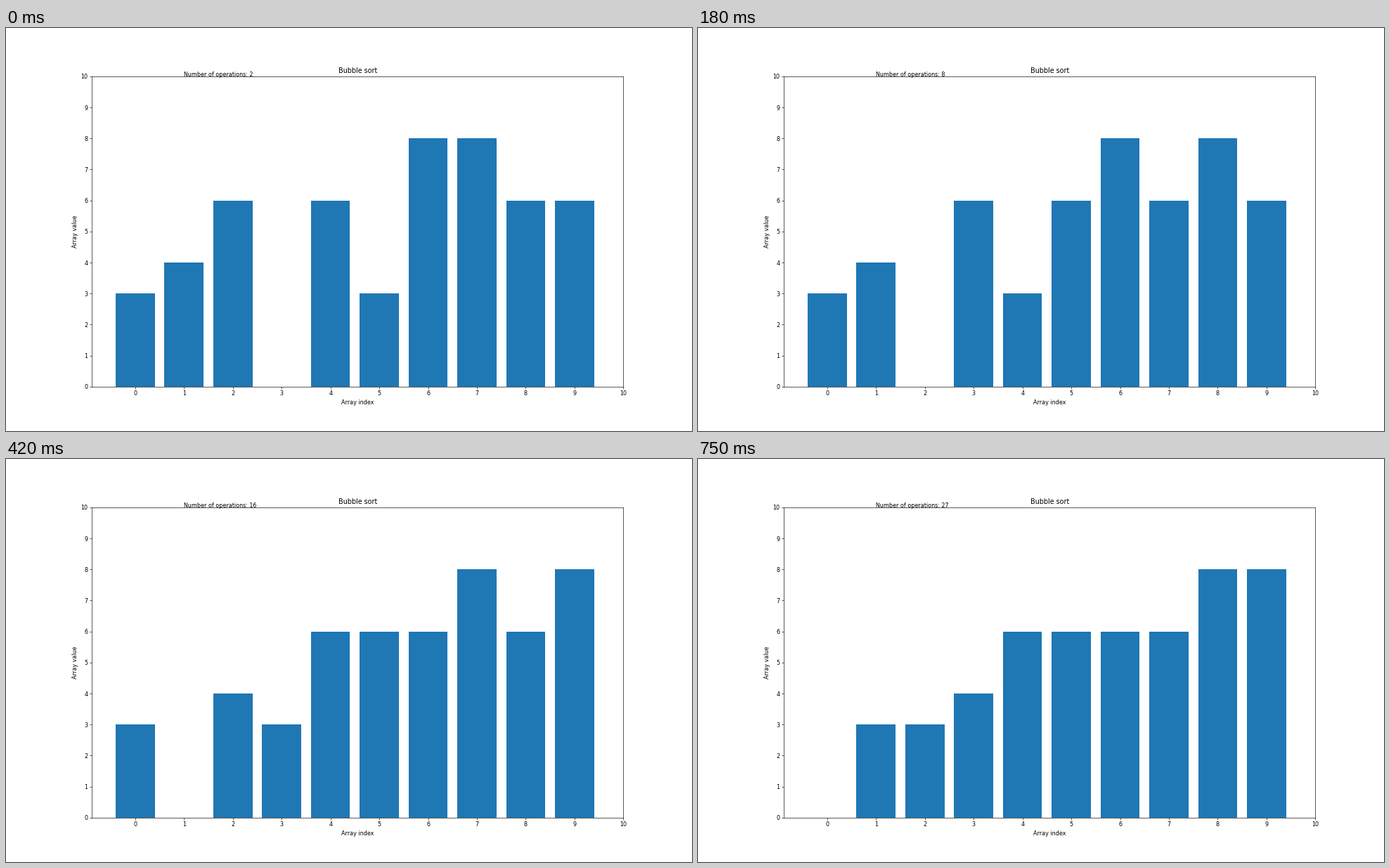
These frames come from a looping animation (976x574 px, 780 ms). A matplotlib script:

```python
import matplotlib.pyplot as plt
from matplotlib.animation import FuncAnimation

WIDTH, HEIGHT, DPI = 976, 574, 57.6
START = [3, 4, 6, 0, 6, 3, 8, 8, 6, 6]
FIRST_OP = 2
FRAMES = 26
INTERVAL = 30


def bubble_states(values):
    """Array after each comparison, until a pass leaves the array sorted."""
    values = list(values)
    states = [list(values)]
    while values != sorted(values):
        for j in range(len(values) - 1):
            if values[j] > values[j + 1]:
                values[j], values[j + 1] = values[j + 1], values[j]
            states.append(list(values))
    return states


states = bubble_states(START)

# The small surplus keeps the pixel size from rounding down.
fig, ax = plt.subplots(
    figsize=((WIDTH + 0.001) / DPI, (HEIGHT + 0.001) / DPI), dpi=DPI
)
fig.subplots_adjust(left=0.125, right=0.9, bottom=0.11, top=0.88)

bars = ax.bar(range(len(START)), START, color="#1f77b4")
ax.set_xlim(-0.89, 10)
ax.set_ylim(0, 10)
ax.set_xticks(range(11))
ax.set_yticks(range(11))
ax.set_title("Bubble sort")
ax.set_xlabel("Array index")
ax.set_ylabel("Array value")
counter = ax.text(1, 10, "")


def draw(frame):
    op = frame + FIRST_OP
    for bar, value in zip(bars, states[op]):
        bar.set_height(value)
    counter.set_text(f"Number of operations: {op}")
    return [*bars, counter]


anim = FuncAnimation(
    fig, draw, frames=FRAMES, interval=INTERVAL,
    init_func=lambda: draw(0), repeat=True, repeat_delay=0, blit=False,
)

plt.show()
```
